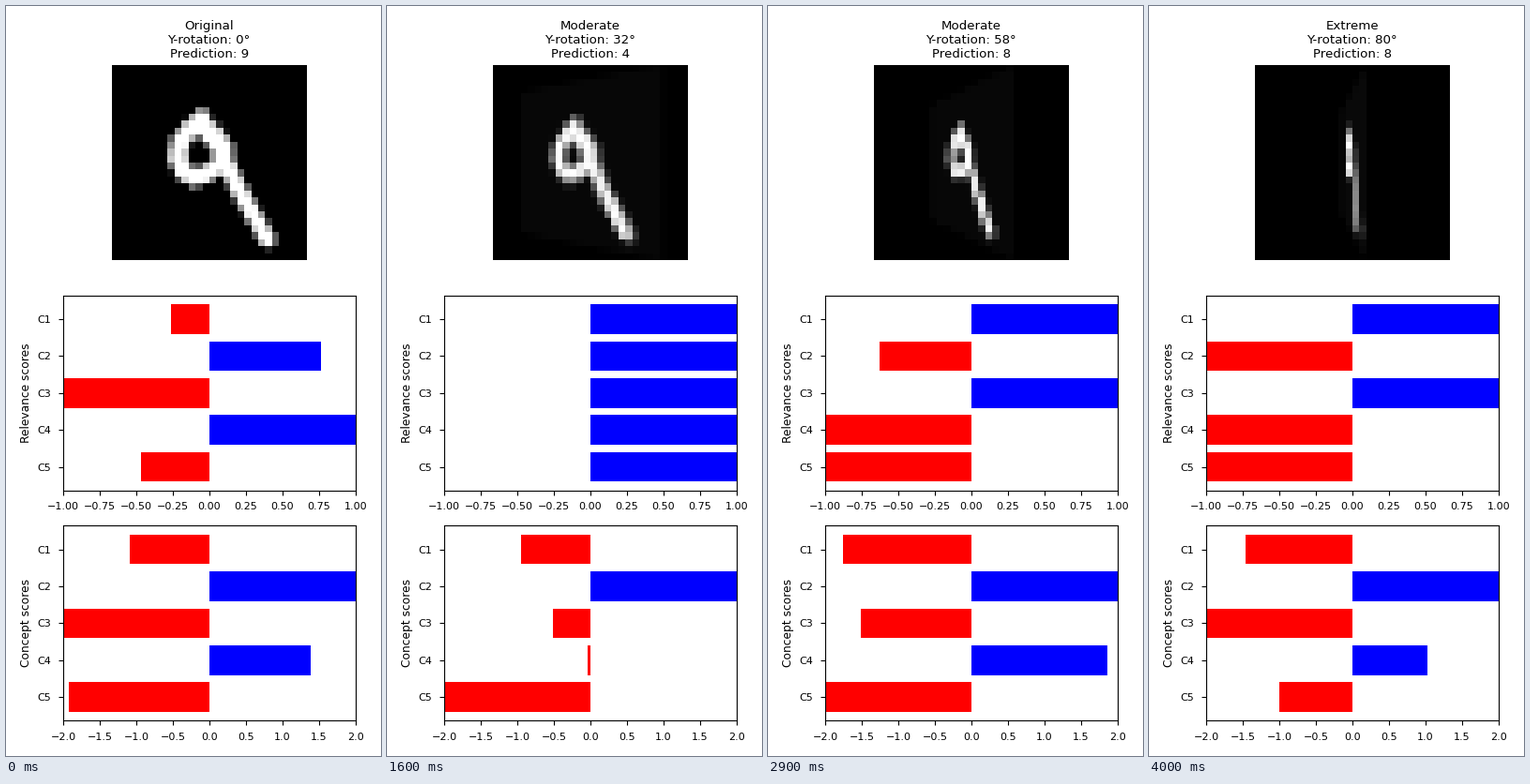
Animation, 400 px wide and 800 px high, one loop 4100 ms. Source, as a matplotlib script:

```python
import numpy as np
import matplotlib.pyplot as plt
from matplotlib.animation import FuncAnimation

W, H, DPI = 400, 800, 100
FRAMES, STEP_MS, STEP_DEG = 41, 100, 2
N, HALF = 28, 14        # image cells and half of them
DEPTH = 45.8            # viewing distance in cells
PLATE = 0.03            # grey level of the tilted plate
LABELS = ["C1", "C2", "C3", "C4", "C5"]

# Pen strokes of the digit: radius and points in cells
STROKES = [
    (1.25, [(12.9, 7.6), (11.2, 9.2), (9.8, 11), (9.4, 13.2), (10.2, 15.2),
            (11.7, 16.2), (13.4, 15.7), (15.2, 14.6)]),
    (1.5, [(12.8, 8.6), (14.4, 10), (15.9, 11.8), (15.9, 14.2)]),
    (1.15, [(16.2, 13.5), (17.1, 15.5), (18.3, 18), (22.3, 25)]),
]

# Key points (frame, score) of each concept
CONCEPT_KEYS = [
    [(6, -1.09), (7, -0.95), (21, -0.94), (29, -1.76), (33, -1.46)],
    [(0, 2)],
    [(0, -2), (7, -0.37), (21, -0.59), (29, -1.51), (33, -1.58), (36, -2)],
    [(0, 1.385), (6, 1), (7, 0.58), (16, -0.04), (21, 0.975), (29, 1.86),
     (33, 1.23), (40, 1.025)],
    [(0, -1.92), (6, -2), (33, -2), (40, -1)],
]
FIRST_RELEVANCE = np.array([-0.26, 0.76, -1, 1, -0.47])
NINE_RELEVANCE = np.array([1, -1, -1, -1, 1])

rows, cols = np.mgrid[0:N, 0:N] + 0.5


def segment_distance(p, q):
    (px, py), (qx, qy) = p, q
    dx, dy = qx - px, qy - py
    t = ((cols - px) * dx + (rows - py) * dy) / (dx * dx + dy * dy)
    t = np.clip(t, 0, 1)
    return np.hypot(cols - px - t * dx, rows - py - t * dy)


def draw_digit():
    ink = np.zeros((N, N))
    for radius, pts in STROKES:
        for p, q in zip(pts, pts[1:]):
            level = radius + 0.5 - segment_distance(p, q)
            ink = np.maximum(ink, np.clip(level, 0, 1))
    return ink


SHEET = PLATE + (1 - PLATE) * draw_digit()
PADDED = np.pad(SHEET, 2)


def bilinear(x, y):
    x = np.clip(x + 1.5, 0, N + 2.99)
    y = np.clip(y + 1.5, 0, N + 2.99)
    i, j = y.astype(int), x.astype(int)
    v, u = y - i, x - j
    top = PADDED[i, j] * (1 - u) + PADDED[i, j + 1] * u
    low = PADDED[i + 1, j] * (1 - u) + PADDED[i + 1, j + 1] * u
    return top * (1 - v) + low * v


def tilted(degrees):
    """Digit sheet turned about the vertical axis, fitted and centred."""
    s, c = np.sin(np.radians(degrees)), np.cos(np.radians(degrees))
    near = DEPTH - HALF * s
    far_scale = near / (DEPTH + HALF * s)
    shift = 0.25 * s - HALF * c * (1 - far_scale) / 2
    img = np.zeros((N, N))
    # The narrower the sheet, the more source columns each cell averages
    for offset in np.linspace(-0.5, 0.5, 7) * (1 - c):
        dx = cols - HALF - shift + offset
        x = dx * DEPTH / np.maximum(c * near + dx * s, 1e-3)
        y = (rows - HALF) * (DEPTH - x * s) / near
        img += bilinear(x + HALF, y + HALF)
    return (img - img.min()) / (img.max() - img.min())


def concept_scores(n):
    return [np.interp(n, *zip(*keys)) for keys in CONCEPT_KEYS]


def predicted(n):
    """The class flips between look-alikes as the digit turns."""
    if n < 14:
        return 9
    return 4 if n < 19 or 31 <= n < 37 else 8


def relevance_scores(n):
    digit = predicted(n)
    if digit == 4:
        return np.ones(5)
    if digit == 9:
        t = min(n / 6, 1)
        return FIRST_RELEVANCE * (1 - t) + NINE_RELEVANCE * t
    bump = max(-1, -0.63 - 0.1 * abs(n - 29))
    ramp = np.clip(0.25 * (n - 25), -0.99, 1)
    return [1, bump, ramp, -1, -1]


def severity(degrees):
    if degrees == 0:
        return "Original"
    if degrees <= 30:
        return "Minor"
    return "Moderate" if degrees <= 60 else "Extreme"


fig = plt.figure(figsize=(W / DPI, H / DPI), dpi=DPI, facecolor="white")


def add_axes(left, top, width, height):
    return fig.add_axes([left / W, 1 - (top + height) / H, width / W, height / H])


def bar_chart(top, limit, label):
    ax = add_axes(61, top, 312, 208)
    bars = ax.barh(range(5), [0] * 5, height=0.8)
    ax.set_xlim(-limit, limit)
    ax.set_xticks(np.linspace(-limit, limit, 9))
    ax.set_ylim(4.64, -0.64)
    ax.set_yticks(range(5), LABELS)
    ax.tick_params(labelsize=8, pad=5.5)
    ax.set_ylabel(label, fontsize=8.8)
    return bars


pic_ax = add_axes(113, 63, 208, 208)
pic_ax.axis("off")
picture = pic_ax.imshow(tilted(0), cmap="gray", vmin=0, vmax=1,
                        interpolation="nearest", aspect="auto")
title = pic_ax.set_title("", fontsize=9.6, x=0.4985)
relevance_bars = bar_chart(308.8, 1, "Relevance scores")
concept_bars = bar_chart(554.4, 2, "Concept scores")


def set_bars(bars, values):
    for bar, value in zip(bars, values):
        bar.set_width(value)
        bar.set_facecolor("blue" if value > 0 else "red")


def update(n):
    degrees = STEP_DEG * n
    picture.set_data(tilted(degrees))
    title.set_text(f"{severity(degrees)}\nY-rotation: {degrees}°\n"
                   f"Prediction: {predicted(n)}")
    set_bars(relevance_bars, relevance_scores(n))
    set_bars(concept_bars, concept_scores(n))
    return [picture, title, *relevance_bars, *concept_bars]


anim = FuncAnimation(fig, update, frames=FRAMES, interval=STEP_MS,
                     repeat=True, repeat_delay=0, blit=False)
plt.show()
```
